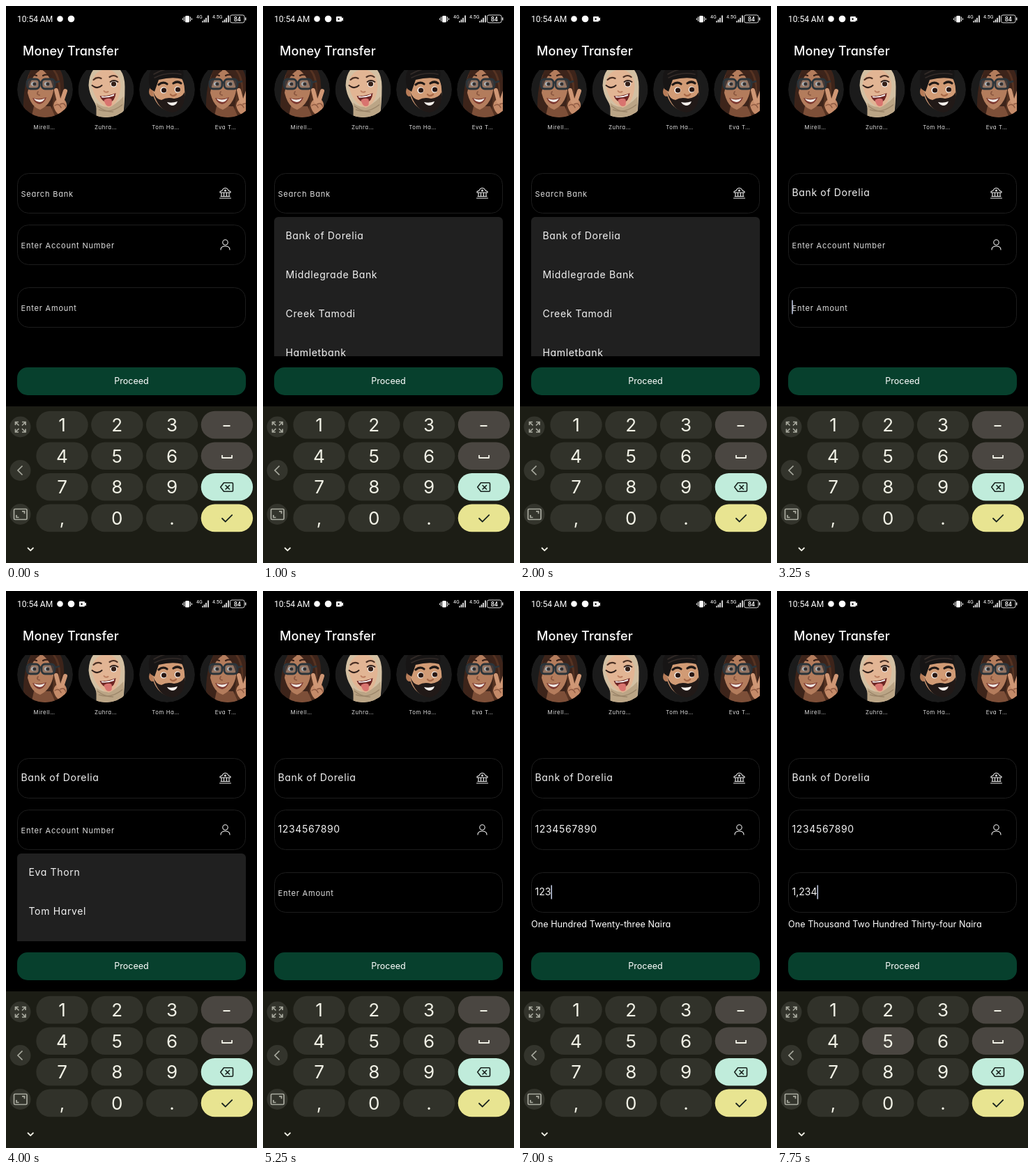
An HTML page for the animation above (8 s loop, 360 px wide and 800 px high).

```html
<!DOCTYPE html>
<html lang="en">
<head>
<meta charset="utf-8">
<title>Money Transfer</title>
<style>
html, body { margin: 0; height: 100%; overflow: hidden; background: #000; }
svg { display: block; width: 100vw; height: 100vh; }
text { font-family: Inter, sans-serif; font-feature-settings: "cv11"; fill: #fff; }
.title { font-size: 18px; font-weight: 500; letter-spacing: .1px; }
.hint { font-size: 11px; letter-spacing: .8px; fill: #dedede; }
.value { font-size: 14px; letter-spacing: .65px; fill: #f2f2f2; }
.amount { letter-spacing: 0; }
.words { font-size: 12.6px; letter-spacing: .05px; }
.name { font-size: 7.8px; letter-spacing: .6px; fill: #ddd; }
.middle { text-anchor: middle; }
.status text { font-family: Roboto, sans-serif; }
.digit { font-size: 26px; fill: #f1f1e6; text-anchor: middle; }
.line { fill: none; stroke-linecap: round; stroke-linejoin: round; }
.field { fill: #000; stroke: #1d1d1d; }
</style>
</head>
<body>
<svg viewBox="0 0 360 800" preserveAspectRatio="none">
  <defs>
    <clipPath id="disc"><circle r="40"/></clipPath>
    <clipPath id="strip"><rect x="16" y="92" width="328" height="70"/></clipPath>
    <clipPath id="menu"><rect x="16" y="300" width="328" height="203"/></clipPath>
    <g id="woman" clip-path="url(#disc)">
      <circle r="40" fill="#1b1b1b"/>
      <path d="M-31 34Q-32 4-26-14Q-20-42 6-40Q26-34 27-8Q28 20 33 40H-31Z" fill="#3d241a"/>
      <path d="M8-34Q24-22 22 6L27 36H8Q16 0 8-34Z" fill="#563322"/>
      <path d="M-16 24H8L16 42H-20Z" fill="#7d4f38"/>
      <path d="M-27-8Q-24-29-8-31Q10-28 13-8Q12 20-7 29Q-24 24-27-8Z" fill="#b37c5c"/>
      <path d="M-29 4Q-27-30-4-38L-8-27Q-20-20-25 4ZM-9-31Q8-24 13 4L20 2Q18-32-4-38Z" fill="#3d241a"/>
      <path d="M-22-19q5-3 10-1M-3-20q6-3 12 1" class="line" stroke="#39221a" stroke-width="2.200"/>
      <ellipse cx="-16" cy="-8" rx="4" ry="3" fill="#ddd"/><ellipse cx="3" cy="-8" rx="4" ry="3" fill="#ddd"/>
      <circle cx="-15" cy="-8" r="2.600" fill="#25150f"/><circle cx="4" cy="-8" r="2.600" fill="#25150f"/>
      <g fill="#54687455" stroke="#2b343a" stroke-width="2.800">
        <rect x="-26" y="-15" width="18" height="14" rx="5"/><rect x="-5" y="-15" width="19" height="14" rx="5"/>
        <path d="M-8-10h3M14-10l7-2" fill="none"/>
      </g>
      <path d="M-10 3q-3 4 2 5" class="line" stroke="#8d5941" stroke-width="2"/>
      <path d="M-18 12Q-8 15 2 11Q-1 20-8 21Q-15 20-18 12Z" fill="#7e3a31"/>
      <path d="M-16 13Q-8 16 0 12.500Q-3 18-8 18Q-14 17-16 13Z" fill="#f1e9e4"/>
      <path d="M12 23Q13 14 22 13Q32 14 31 25Q28 35 20 36Q14 32 12 23Z" fill="#c58b69"/>
      <path d="M20 17L16 1M24 17L29 2" class="line" stroke="#cf9775" stroke-width="6"/>
      <path d="M14 23q6-4 9 3M22 21q6-3 8 4" class="line" stroke="#905b43" stroke-width="1.500"/>
    </g>
    <g id="scarf" clip-path="url(#disc)">
      <circle r="40" fill="#1b1b1b"/>
      <path d="M-25-6Q-24-37 4-38Q27-33 27-4Q27 20 24 40H-14Q-11 27-18 16Q-24 6-25-6Z" fill="#d3c0a3"/>
      <path d="M-14 19Q4 34 25 10Q27 30 21 40H-14Z" fill="#bba586"/>
      <path d="M-10 29Q7 35 23 22M-12 24Q-2 32 10 32" class="line" stroke="#9c866a" stroke-width="1.500"/>
      <path d="M-21-7Q-18-28 1-29Q20-26 21-5Q19 21 4 26Q-15 21-21-7Z" fill="#e2b594"/>
      <path d="M-18-14q5-5 11-2M5-18q6-4 11 0" class="line" stroke="#4b3024" stroke-width="2.200"/>
      <path d="M-17-4q6 3 11-2M-17-4l-3-2" class="line" stroke="#33221c" stroke-width="2"/>
      <ellipse cx="11" cy="-8" rx="4.500" ry="4.500" fill="#fff"/><circle cx="11" cy="-8" r="3.600" fill="#352018"/>
      <path d="M6-11q5-4 11 0" class="line" stroke="#33221c" stroke-width="1.800"/>
      <path d="M-3 2q2 3 6 1" class="line" stroke="#be8062" stroke-width="2"/>
      <path d="M-9 9Q3 10 14 5Q13 17 4 19Q-6 18-9 9Z" fill="#6d2524"/>
      <path d="M-7 9.500Q3 11 12 6.500L11 9Q3 12-6 11.500Z" fill="#fff"/>
      <path d="M-3 15Q3 11 8 14Q10 24 4 24Q-1 24-3 15Z" fill="#d9746f"/>
    </g>
    <g id="man" clip-path="url(#disc)">
      <circle r="40" fill="#1b1b1b"/>
      <ellipse cx="-21" cy="3" rx="5" ry="7" fill="#b77c58"/>
      <path d="M-21-14Q-10-23 18-20Q27-10 25 10Q20 30 6 32Q-14 28-20 8Z" fill="#d19b75"/>
      <path d="M-24-1Q-29-18-23-28Q-14-42 12-37Q28-30 22-15Q8-19-12-14L-18 3Z" fill="#171515"/>
      <path d="M-19-22Q-2-33 18-28M-18-17Q0-26 20-22" class="line" stroke="#332b28" stroke-width="1.500"/>
      <path d="M-20 3Q-16 14-8 15Q0 10 10 13Q21 12 25 4Q27 29 8 33Q-13 31-20 3Z" fill="#211917"/>
      <path d="M-12-7q6-5 12-1M9-9q6-4 11 0" class="line" stroke="#211916" stroke-width="3.200"/>
      <ellipse cx="-5" cy="1" rx="4.500" ry="4.500" fill="#fff"/><ellipse cx="15" cy="0" rx="4.200" ry="4.500" fill="#fff"/>
      <circle cx="-4.500" cy="1" r="3.600" fill="#2a1813"/><circle cx="15.500" cy="0" r="3.600" fill="#2a1813"/>
      <path d="M5 7q3 4 8 0" class="line" stroke="#a96a49" stroke-width="2.400"/>
      <path d="M0 18Q7 20 15 17Q13 23 7 23Q2 22 0 18Z" fill="#f5f0ec"/>
    </g>
  </defs>

  <rect width="360" height="800"/>

  <g class="status">
    <text x="16" y="23" font-size="12">10:54 AM</text>
    <circle cx="77.5" cy="18.5" r="4.300" fill="#fff"/>
    <circle cx="93.5" cy="18.5" r="4.800" fill="#fff"/>
    <path id="camera" d="M106 15h6q1 0 1 1v1.500l2-1v5l-2-1v1q0 1-1 1h-6q-1 0-1-1v-5.500q0-1 1-1ZM107.500 17v3.500l3-1.700Z" fill="#fff" fill-rule="evenodd"/>
    <rect x="257" y="14" width="6" height="9.500" rx="1.500" fill="#fff"/>
    <path d="M255.500 15.500v6.500M264.500 15.500v6.500M253.500 17.500v2.500M266.500 17.500v2.500" stroke="#fff"/>
    <text x="273" y="18" font-size="7">4G</text>
    <text x="296" y="18" font-size="7">4.5G</text>
    <path d="M282 23.500v-2M284.500 23.500v-4M287 23.500v-6.500M290 23.500v-10M311 23.500v-2M313.500 23.500v-4M316 23.500v-6.500M319 23.500v-10" stroke="#fff" stroke-width="1.600"/>
    <rect x="321.500" y="13" width="20.500" height="11" rx="2.500" fill="none" stroke="#ddd"/>
    <path d="M343.700 16.500v4" stroke="#ddd" stroke-width="1.500"/>
    <text x="331.800" y="21.800" font-size="9" font-weight="500" class="middle">84</text>
  </g>

  <text x="24" y="70.500" class="title">Money Transfer</text>
  <g clip-path="url(#strip)">
    <use href="#woman" x="56" y="120"/><use href="#scarf" x="143.500" y="120"/>
    <use href="#man" x="231" y="120"/><use href="#woman" x="318" y="120"/>
  </g>
  <g class="middle">
    <text x="55" y="177" class="name">Mirell…</text>
    <text x="143" y="177" class="name">Zuhra…</text>
    <text x="229" y="177" class="name">Tom Ha…</text>
    <text x="315" y="177" class="name">Eva T…</text>
  </g>

  <rect class="field" x="16.500" y="240.500" width="327" height="57" rx="16"/>
  <rect class="field" x="16.500" y="314.500" width="327" height="57" rx="16"/>
  <rect class="field" x="16.500" y="404.500" width="327" height="57" rx="16"/>
  <text id="bank" x="21.500"></text>
  <text id="account" x="21.500"></text>
  <text id="amount" x="21.500"></text>
  <rect id="cursor" y="422.500" width="1.600" height="20" fill="#bcc5dc"/>
  <text id="words" x="16" y="483" class="words"></text>
  <g class="line" stroke="#eee" stroke-width="1.100">
    <path d="M307 268v-1.500l3-1.500q1.500-3.500 4.500-3.500t4.500 3.500l3 1.500v1.500ZM309 268v5M312.500 268v5M316.500 268v5M320 268v5M308 273.500h13M306.500 276h16"/>
    <circle cx="314.500" cy="265" r="1"/>
    <circle cx="314.500" cy="339.500" r="3.700"/>
    <path d="M308 350q0-5 6.500-5t6.500 5"/>
  </g>

  <g clip-path="url(#menu)">
    <g id="banks">
      <rect x="16" y="303" width="328" height="220" rx="6" fill="#202020"/>
      <text x="32.500" y="335" class="value">Bank of Dorelia</text>
      <text x="32.500" y="391" class="value">Middlegrade Bank</text>
      <text x="32.500" y="447" class="value">Creek Tamodi</text>
      <text x="32.500" y="503" class="value">Hamletbank</text>
    </g>
    <g id="people">
      <rect x="16" y="377" width="328" height="140" rx="6" fill="#202020"/>
      <text x="32.500" y="409" class="value">Eva Thorn</text>
      <text x="32.500" y="465" class="value">Tom Harvel</text>
    </g>
  </g>

  <rect x="16" y="519" width="328" height="40" rx="15" fill="#07402d"/>
  <text x="180" y="543" font-size="12.500" class="middle">Proceed</text>

  <rect y="575" width="360" height="225" fill="#1c1d15"/>
  <g id="keys"></g>
  <g class="line" stroke="#f1f1e6" stroke-width="1.800">
    <path d="M311.500 603h10M310 645v4h14v-4" stroke-linecap="butt"/>
    <path d="M31.500 778.500l3.700 3.700 3.700-3.700"/>
    <g stroke="#18231e">
      <path d="M312.500 684.800h11.500q1.500 0 1.500 1.500v9.500q0 1.500-1.500 1.500h-11.500l-4.800-6.200ZM315 688.500l5.500 5.500M320.500 688.500l-5.500 5.500" stroke-width="1.600"/>
      <path d="M310 736l4.700 4.700 9.500-9.500"/>
    </g>
  </g>
  <g fill="#33342c">
    <circle cx="20.500" cy="604.500" r="15"/><circle cx="20.500" cy="667" r="15"/><circle cx="20.500" cy="730" r="15"/>
  </g>
  <g fill="none" stroke="#a9aa9f" stroke-width="1.700">
    <path d="M13.500 602v-4.500h4.500M13.500 597.500l5 5M23 597.500h5v4.500M28 597.500l-5 5M13.500 607.500v4.500h4.500M13.500 612l5-5M23 612h5v-4.500M28 612l-5-5"/>
    <path d="M23.500 660.500l-6.500 6.500 6.500 6.500"/>
    <rect x="11.500" y="722.500" width="18.500" height="15" rx="1.500"/>
    <path d="M15 731v3.500h3.500M23 725.800h3.500v3.500"/>
  </g>
</svg>
<script>
const LOOP = 8000, KEY = '#31322a', SOFT = '#4a4641';
const $ = id => document.getElementById(id);
const labels = ['123', '456', '789', ',0.'];
const sideFills = [SOFT, SOFT, '#c0ecdb', '#e8e491'];
const spoken = ['', 'One', 'Twelve', 'One Hundred Twenty-three', 'One Thousand Two Hundred Thirty-four'];

$('keys').innerHTML = labels.map((row, r) => [...row, ''].map((label, c) => {
  const x = 43.3 + c * 78.8, y = 581.8 + r * 44.6;
  return `<rect id="key${label}" x="${x}" y="${y}" width="74.400" height="39.600" rx="19.800" fill="${label ? KEY : sideFills[r]}"/>` +
    `<text class="digit" x="${x + 37.2}" y="${y + 29.2}">${label}</text>`;
}).join('')).join('');

const show = (id, on) => $(id).setAttribute('visibility', on ? 'visible' : 'hidden');

function fill(id, value, hint, y, style = '') {
  const el = $(id);
  el.textContent = value || hint;
  el.setAttribute('class', value ? 'value ' + style : 'hint');
  el.setAttribute('y', value ? y : y + 1);
}

function draw(t) {
  const between = (a, b) => t >= a && t < b;
  const typed = Math.max(0, Math.floor((t - 5500) / 500));
  const blink = start => (t - start) % 1000 < 500;

  show('camera', t >= 500);
  show('banks', between(1000, 2250));
  show('people', between(3750, 4750));
  fill('bank', t >= 2250 && 'Bank of Dorelia', 'Search Bank', 273);
  fill('account', t >= 4750 && '1234567890', 'Enter Account Number', 347);
  fill('amount', typed && Number('1234'.slice(0, typed)).toLocaleString('en-US'), 'Enter Amount', 437, 'amount');
  $('words').textContent = typed ? spoken[typed] + ' Naira' : '';

  show('cursor', typed || (between(2250, 3750) && blink(2250)) || (t >= 4750 && blink(4750)));
  $('cursor').setAttribute('x', typed ? 21.5 + $('amount').getComputedTextLength() : 21.2);

  for (let n = 1; n <= 5; n++) {
    const press = 5250 + n * 500;
    $('key' + n).setAttribute('fill', between(press, press + 250) ? SOFT : KEY);
  }
}

function frame() {
  draw(performance.now() % LOOP);
  requestAnimationFrame(frame);
}
frame();
</script>
</body>
</html>
```
